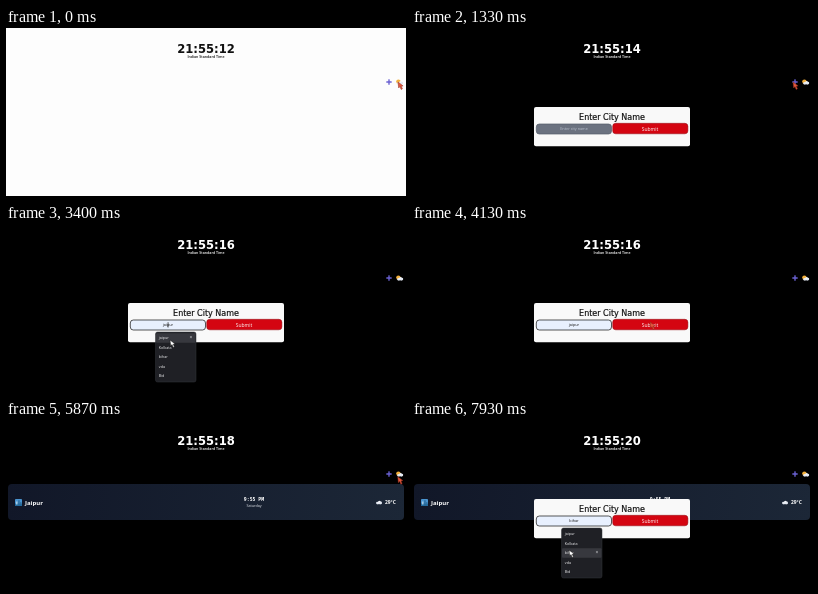
An HTML page with a canvas for the animation above (8000 ms loop, 400 px wide and 168 px high).

```html
<!DOCTYPE html>
<html lang="en">
<head>
<meta charset="utf-8">
<title>City clock</title>
<style>
  html, body { margin: 0; width: 100%; height: 100%; overflow: hidden; background: #000; }
  canvas { display: block; width: 400px; height: 168px; }
</style>
</head>
<body>
<canvas width="400" height="168"></canvas>
<script>
const ctx = document.querySelector('canvas').getContext('2d');
const LOOP = 8000;
const SANS = '"Open Sans", "Noto Sans", sans-serif';
const WIDE = '"DejaVu Sans", sans-serif';
const MONO = '"Noto Sans Mono", monospace';
const CITIES = ['jaipur', 'Kolkata', 'bihar', 'vda', 'Bid'];
const MENU = { x: 149.5, y: 108, w: 40.5, h: 50, row: 9.5 };

const THEME = [70, 250];
const FIRST_POPUP = [1200, 4300], SECOND_POPUP = [6270, LOOP];
const FIRST_FOCUS = 2330, SECOND_FOCUS = 7470;
const FIRST_MENU = [2400, 3560], SECOND_MENU = [7540, LOOP];
const CARD_START = 4300;

// Pointer stops: time, x, y
const PATH = [
  [0, 392, 54], [670, 392, 54], [1000, 381, 54], [1400, 381, 54],
  [2000, 240, 92], [2300, 165, 100], [2900, 165, 102], [3250, 164, 116],
  [3650, 164, 116], [4100, 238, 98], [4320, 238, 98], [4750, 114, 91],
  [4900, 114, 91], [5480, 390, 62], [5800, 393, 57], [6150, 381, 54],
  [6400, 381, 54], [6800, 277, 79], [7220, 242, 92], [7440, 165, 100],
  [7560, 162, 102], [7900, 157, 130], [8000, 157, 130]
];

const within = (t, [start, end]) => t >= start && t < end;
const clamp = v => Math.max(0, Math.min(1, v));
const mix = (a, b, k) => a + (b - a) * k;
const grey = v => `rgb(${v},${v},${v})`;

function pointerAt(t) {
  const i = PATH.findIndex(stop => stop[0] > t);
  const [t0, x0, y0] = PATH[i - 1], [t1, x1, y1] = PATH[i];
  const k = (t - t0) / (t1 - t0), eased = k * k * (3 - 2 * k);
  return { x: mix(x0, x1, eased), y: mix(y0, y1, eased) };
}

function text(str, x, y, size, color, { font = SANS, weight = 400, align = 'center' } = {}) {
  ctx.font = `${weight} ${size}px ${font}`;
  ctx.textAlign = align;
  ctx.fillStyle = color;
  ctx.fillText(str, x, y);
}

function box(x, y, w, h, r, fill, stroke, line = 0.7) {
  ctx.beginPath();
  ctx.roundRect(x, y, w, h, r);
  ctx.fillStyle = fill;
  ctx.fill();
  if (!stroke) return;
  ctx.strokeStyle = stroke;
  ctx.lineWidth = line;
  ctx.stroke();
}

function disc(x, y, r, fill) {
  ctx.beginPath();
  ctx.arc(x, y, r, 0, 7);
  ctx.fillStyle = fill;
  ctx.fill();
}

function cloud(x, y) {
  disc(x + 1.5, y + 2.4, 1.2, '#e4e9f2');
  disc(x + 3.6, y + 1.6, 1.5, '#f4f6fa');
  disc(x + 4.9, y + 2.3, 1.3, '#e4e9f2');
  box(x + 1.4, y + 2, 3.6, 1.6, 0, '#e4e9f2');
}

function drawToolbar() {
  box(380.2, 53.3, 5.6, 1.4, 0.4, '#6a61d2');
  box(382.3, 51.2, 1.4, 5.6, 0.4, '#6a61d2');
  disc(392.4, 53.6, 2.2, '#f3b03c');
  cloud(391, 52.8);
}

function drawClock(t, ink) {
  const second = 12 + Math.floor((t + 735) / 1000);
  text(`21:55:${second}`, 200, 25.4, 11.6, ink, { font: WIDE, weight: 700 });
  text('Indian Standard Time', 200, 30.2, 3.6, ink, { weight: 600 });
}

function drawCard() {
  const shade = ctx.createLinearGradient(2, 64, 398, 100);
  shade.addColorStop(0, '#111728');
  shade.addColorStop(1, '#1c2737');
  box(2, 64, 396, 36, 4, shade);

  box(9, 79, 7, 7, 0.8, '#4a94cf');
  box(9, 83.6, 7, 2.4, 0.5, '#236a9c');
  box(10, 81.5, 1.5, 3, 0, '#a5c9e2');
  box(12.2, 80.2, 1.5, 4.3, 0, '#2f6f9f');
  box(14.2, 82, 1.2, 2.5, 0, '#2f6f9f');

  text('Jaipur', 19, 84.7, 6, '#fff', { weight: 700, align: 'left' });
  text('9:55 PM', 248, 81, 4.85, '#fff', { font: MONO, weight: 600 });
  text('Saturday', 248, 86.7, 3.7, '#e6e9ef');
  cloud(369.8, 80.6);
  text('29°C', 379, 84.4, 4.9, '#fff', { weight: 700, align: 'left' });
}

function drawPopup(t, focused, value) {
  box(122, 79, 156, 39.3, 2, '#f9f9f9');
  text('Enter City Name', 200, 92, 8, '#111', { font: WIDE });
  ctx.strokeStyle = '#111';
  ctx.lineWidth = 0.2;
  ctx.strokeText('Enter City Name', 200, 92);

  box(124.3, 96, 75.2, 10, 3, value ? '#e8f0fe' : '#6b7280', focused ? '#111' : '#555c69');
  text(value || 'Enter city name', 162, 102.3, 3.8, value ? '#111' : '#bcc3cf');
  if (focused && (t + 100) % 1000 >= 250 && (t + 100) % 1000 < 750) {
    box(161.7, 98.3, 0.7, 5.2, 0, '#111');
  }
  box(200.7, 95.3, 75.2, 10.5, 3, '#d40511', '#8d0b12', 0.5);
  text('Submit', 238, 102.5, 5, '#fff', { weight: 500 });
}

function drawMenu(hovered) {
  box(MENU.x, MENU.y, MENU.w, MENU.h, 2, '#1f2025', '#33343a', 0.5);
  CITIES.forEach((city, i) => {
    const y = MENU.y + 1.2 + i * MENU.row;
    if (i === hovered) {
      box(MENU.x + 0.5, y, MENU.w - 1, MENU.row, 1, '#37383e');
      text('×', 185, y + 6.1, 5, '#d5d6da');
    }
    text(city, 152.8, y + 6, 3.7, '#f0f0f2', { align: 'left' });
  });
}

function drawPointer({ x, y }, plain) {
  const size = 0.85;
  ctx.beginPath();
  [[0, 0], [0.8, 7], [2.3, 5.4], [3.7, 8.8], [5.2, 8], [3.8, 5], [6, 4.6]]
    .forEach(([dx, dy]) => ctx.lineTo(x + dx * size, y + dy * size));
  ctx.closePath();
  ctx.fillStyle = plain ? '#fff' : '#e2573c';
  ctx.fill();
  ctx.strokeStyle = plain ? '#111' : '#8f2c1c';
  ctx.lineWidth = 0.5;
  ctx.stroke();
}

function draw(t) {
  const light = 1 - clamp((t - THEME[0]) / (THEME[1] - THEME[0]));
  const pointer = pointerAt(t);
  const menuOpen = within(t, FIRST_MENU) || within(t, SECOND_MENU);
  const overMenu = menuOpen && pointer.y >= MENU.y;
  const hovered = overMenu ? Math.max(0, Math.floor((pointer.y - MENU.y - 1.2) / MENU.row)) : -1;
  const chosen = t >= FIRST_MENU[1] && t < FIRST_POPUP[1] ? CITIES[0] : '';
  const focused = within(t, [FIRST_FOCUS, FIRST_POPUP[1]]) || t >= SECOND_FOCUS;

  ctx.fillStyle = grey(Math.round(253 * light));
  ctx.fillRect(0, 0, 400, 168);
  drawClock(t, light > 0.5 ? '#111' : '#fff');
  drawToolbar();
  if (t >= CARD_START) drawCard();
  if (within(t, FIRST_POPUP) || within(t, SECOND_POPUP)) {
    drawPopup(t, focused, CITIES[hovered] || chosen);
  }
  if (menuOpen) drawMenu(hovered);
  drawPointer(pointer, overMenu);
}

function tick() {
  draw(performance.now() % LOOP);
  requestAnimationFrame(tick);
}
tick();
</script>
</body>
</html>
```
